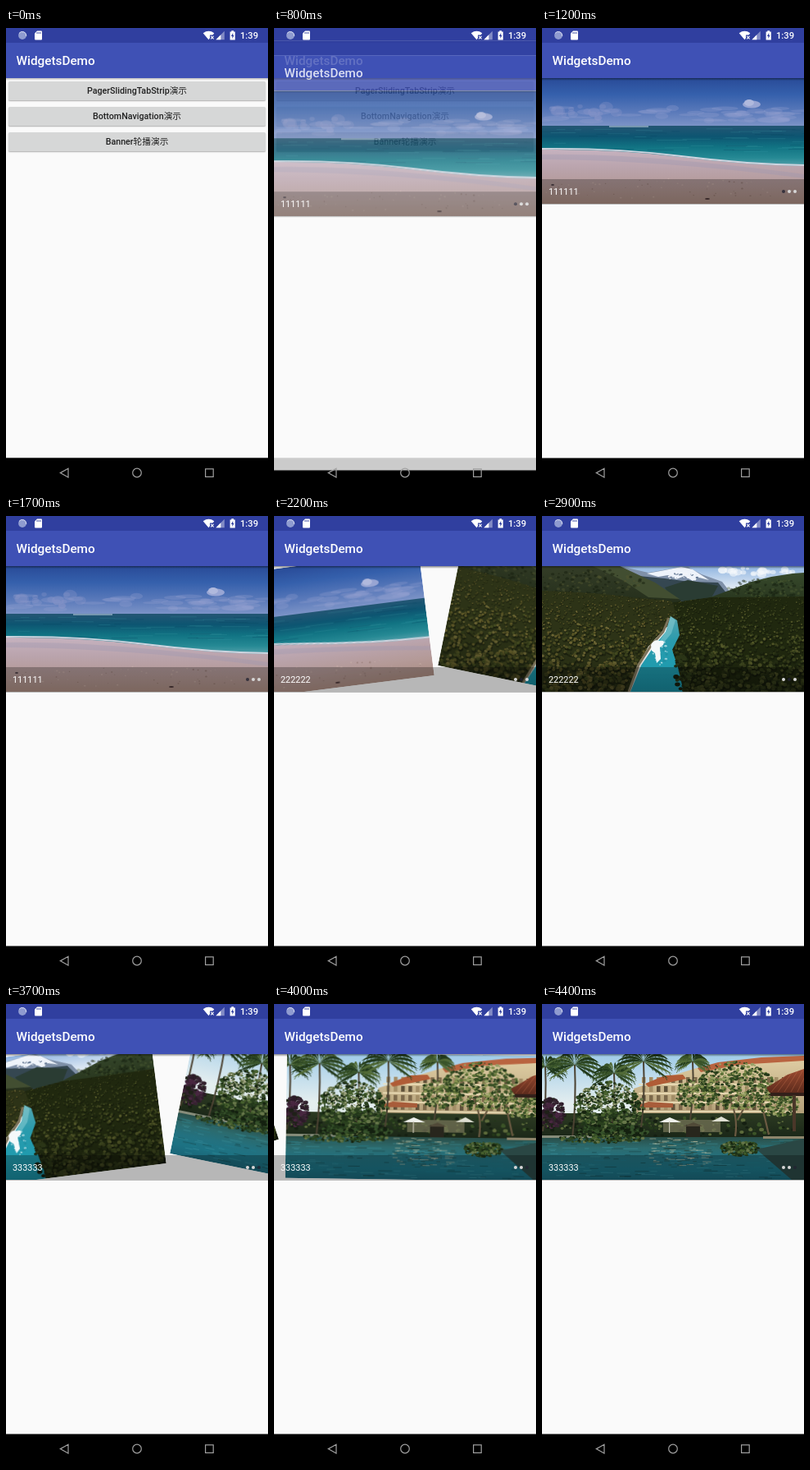
Animation, 320 px wide and 560 px high, one loop 8 s. Source, as an HTML page with a canvas:

```html
<!DOCTYPE html>
<html lang="zh">
<head>
<meta charset="utf-8">
<title>WidgetsDemo</title>
<style>
html, body { margin: 0; width: 100%; height: 100%; overflow: hidden; background: #000; }
#stage { position: relative; width: 320px; height: 560px; overflow: hidden; background: #000;
  font-family: Roboto, "Noto Sans CJK SC", "Noto Sans CJK", sans-serif; }
.screen { position: absolute; left: 0; top: 0; width: 320px; height: 523px; background: #fafafa;
  box-shadow: 0 1px rgba(250,250,250,.3); }
.status { height: 18px; background: #303f9f; }
.bar { position: relative; height: 43px; line-height: 44px; padding-left: 12.5px; background: #3f51b5;
  color: #fff; font-size: 15.3px; font-weight: 500; }
.bar::after { content: ""; position: absolute; left: 0; top: 43px; width: 100%; height: 3px; z-index: 2;
  background: linear-gradient(rgba(0,0,0,.25), transparent); }
.btn { position: absolute; left: 3px; width: 314px; height: 23px; line-height: 23px; border-radius: 1.5px;
  background: #d6d7d7; box-shadow: 0 1px 1.5px rgba(0,0,0,.3); color: #212121; text-align: center;
  font-size: 10.7px; font-weight: 500; overflow: hidden; }
#ripple { position: absolute; inset: 0; background: rgba(0,0,0,.12); }
#banner { position: absolute; left: 0; top: 61px; width: 320px; height: 153px; overflow: hidden;
  box-shadow: 0 1px rgba(0,0,0,.25); }
.page { position: absolute; left: 0; top: 0; transform-origin: 50% 100%; }
#strip { position: absolute; left: 0; bottom: 0; width: 320px; height: 30px; line-height: 31px;
  background: rgba(0,0,0,.27); color: #fff; font-size: 10.9px; }
#label { position: absolute; left: 8px; }
.dot { position: absolute; top: 13px; width: 4.4px; height: 4.4px; border-radius: 50%; }
#icons { position: absolute; left: 0; top: 0; }
</style>
</head>
<body>
<div id="stage">
  <div class="screen">
    <div class="status"></div>
    <div class="bar">WidgetsDemo</div>
    <div class="btn" style="top:65px">PagerSlidingTabStrip演示</div>
    <div class="btn" style="top:95.7px">BottomNavigation演示</div>
    <div class="btn" style="top:126.5px">Banner轮播演示<div id="ripple"></div></div>
  </div>
  <div class="screen" id="detail">
    <div class="status"></div>
    <div class="bar">WidgetsDemo</div>
    <div id="banner">
      <canvas class="page" width="320" height="153"></canvas>
      <canvas class="page" width="320" height="153"></canvas>
      <canvas class="page" width="320" height="153"></canvas>
      <div id="strip">
        <span id="label"></span>
        <i class="dot" style="left:292.8px"></i>
        <i class="dot" style="left:299.8px"></i>
        <i class="dot" style="left:306.8px"></i>
      </div>
    </div>
  </div>
  <svg id="icons" width="320" height="560" fill="#fff">
    <circle cx="20" cy="9" r="4.9" fill="#8f9bd0"/>
    <path d="M16 6.5A4.9 4.9 0 0 1 24.8 10" fill="none" stroke="#d5daf0"/>
    <path d="M38 3.5h5a1 1 0 0 1 1 1v9a1 1 0 0 1-1 1h-7a1 1 0 0 1-1-1v-7z"/>
    <path d="M38 5v2M40 5v2M42 5v2" stroke="#303f9f" stroke-width=".9"/>
    <path d="M240.7 6.2Q247.5 1.5 254.3 6.2L252.5 8.5H249V12.3L247.5 14.2z"/>
    <path d="M250.2 9.8l3.4 3.6M253.6 9.8l-3.4 3.6" stroke="#fff" stroke-width="1.1"/>
    <path d="M266.8 3.8v10.4h-10.4z" opacity=".4"/>
    <path d="M262.3 8.3v5.9h-5.9z"/>
    <path d="M275.3 3.2h2.8v1.2h1.7v10h-6.2v-10h1.7z"/>
    <path d="M277.2 6l-2.3 4h1.5v3l2.2-4.2h-1.4z" fill="#303f9f"/>
    <text x="286" y="13" font-size="11.2" font-weight="500">1:39</text>
    <g fill="none" stroke="#a0a0a0" stroke-width="1.2">
      <path d="M66.3 541.6L76 536.3V547z"/>
      <circle cx="160" cy="541.5" r="5.3"/>
      <rect x="243.6" y="536.8" width="9.6" height="9.6"/>
    </g>
  </svg>
</div>
<script>
const $ = s => document.querySelector(s), $$ = s => [...document.querySelectorAll(s)];
const pages = $$('.page'), dots = $$('.dot');
let c, seed = 7;
const rnd = () => (seed = seed * 16807 % 2147483647) / 2147483647;
const pick = list => list[Math.floor(rnd() * list.length)];

function grad(y0, y1, ...cols) {
  const g = c.createLinearGradient(0, y0, 0, y1);
  cols.forEach((col, i) => g.addColorStop(i / (cols.length - 1), col));
  return g;
}
function rect(x, y, w, h, fill) { c.fillStyle = fill; c.fillRect(x, y, w, h); }
function shape(d, fill) { c.fillStyle = fill; c.fill(new Path2D(d)); }
function line(d, col, w) { c.strokeStyle = col; c.lineWidth = w; c.stroke(new Path2D(d)); }
function oval(x, y, rx, ry, fill) {
  c.fillStyle = fill;
  c.beginPath();
  c.ellipse(x, y, rx, ry, 0, 0, 7);
  c.fill();
}
// Speckles spread over an ellipse
function leaves(n, x, y, rx, ry, size, cols) {
  for (let i = 0; i < n; i++) {
    const a = rnd() * 6.283, d = Math.sqrt(rnd()), r = size * (.5 + rnd());
    oval(x + Math.cos(a) * d * rx, y + Math.sin(a) * d * ry, r, r * .75, pick(cols));
  }
}
// Tree crowns inside an outline, larger towards the viewer
function forest(d, base, n, [x, y, w, h], cols) {
  c.save();
  c.clip(new Path2D(d));
  shape(d, base);
  for (let i = 0; i < n; i++) {
    const k = i / n, r = .7 + k * 2.2 * (.4 + rnd()), px = x + rnd() * w, py = y + k * h;
    oval(px + r * .3, py + r * .7, r * 1.2, r * 1.1, 'rgba(16,22,9,.45)');
    c.globalAlpha = .75;
    oval(px, py, r * .9, r * .8, pick(cols));
    c.globalAlpha = 1;
  }
  c.restore();
}
function palm(x, y, foot, size) {
  line(`M${x} ${y}Q${x + 2} ${(y + foot) / 2} ${x - 3} ${foot}`, '#4b4232', 2);
  for (let i = 0; i < 15; i++) {
    const a = -3.6 + i * .3, ex = x + Math.cos(a) * size, ey = y + Math.sin(a) * size * .55 + size * .25;
    const mx = (x + ex) / 2, my = y + Math.sin(a) * size * .6 - 2;
    const col = pick(['#223a1c', '#39542a', '#2c4522', '#526b38']);
    shape(`M${x} ${y}Q${mx} ${my - 3} ${ex} ${ey}Q${mx} ${my + 4} ${x} ${y}`, col);
    for (let k = .3; k < 1; k += .14) {
      const px = x + (ex - x) * k, py = y + (ey - y) * k + (my - (y + ey) / 2) * 2 * k * (1 - k);
      line(`M${px} ${py}l${Math.cos(a) * 3} 5`, col, .8);
    }
  }
}

function beach() {
  rect(0, 0, 320, 60, grad(0, 60, '#294b98', '#3560ac', '#5878b9', '#7f96c8'));
  for (let i = 0; i < 46; i++)
    oval(rnd() * 320, 36 + rnd() * 17, 6 + rnd() * 15, 1 + rnd() * 3, 'rgba(150,160,208,.28)');
  leaves(16, 55, 42, 55, 8, 6, ['rgba(142,152,203,.3)']);
  oval(256, 32, 11, 4.5, '#98a5d3');
  oval(253, 30, 6, 4, '#b0b9dd');
  rect(0, 58, 320, 60, grad(58, 110, '#245674', '#0d5571', '#117383', '#258994', '#63a7b1'));
  line('M82 59H130', '#c9d8ea', 1.2);
  for (let i = 0; i < 50; i++)
    rect(rnd() * 320, 61 + rnd() * 29, 8 + rnd() * 30, .8, pick(['rgba(8,68,95,.35)', 'rgba(70,165,170,.25)']));
  shape('M0 87Q90 86 170 96T320 107V153H0z', grad(87, 153, '#c5b2bf', '#baa4ad', '#b49a98', '#aa8c81'));
  line('M0 86Q90 85 170 95T320 106', '#cfd5e0', 1.8);
  shape('M0 93Q120 91 320 117V122Q150 100 0 99z', 'rgba(154,148,176,.35)');
  leaves(60, 160, 136, 160, 14, .9, ['rgba(110,80,70,.35)', 'rgba(215,190,180,.4)']);
  oval(13, 130, 2, .9, '#51434a');
  oval(202, 147, 3, 1, '#4a3538');
}

function valley() {
  rect(0, 0, 320, 60, grad(0, 26, '#8fb4e0', '#dfe9f4'));
  leaves(25, 265, 6, 50, 4, 4, ['rgba(245,248,252,.6)']);
  shape('M95 0L130 8L165 2L178 1L195 10L220 19L240 45H100z', '#7f90a8');
  shape('M128 9L150 5L170 1L184 4L204 17L192 14L184 18L174 12L164 16L154 11L142 13z', '#eef3fa');
  leaves(30, 172, 13, 22, 5, 1.2, ['#687c97', '#f2f5fa']);
  shape('M118 12L150 15L180 19L215 20L235 45H120z', '#354751');
  shape('M150 26L178 17L215 24L205 42H160z', '#2a3c33');
  shape('M0 0H80L112 12L142 27L170 42L150 66H0z', grad(0, 50, '#343d27', '#232d1a'));
  shape('M62 0H95L138 20L168 40L130 38L100 18z', '#424e31');
  shape('M320 8L306 9L280 13L256 19L230 29L200 40L190 65H320z', grad(8, 55, '#37492c', '#232f19'));
  leaves(130, 60, 20, 65, 16, 1.6, ['rgba(82,86,48,.45)', 'rgba(22,29,14,.5)']);
  leaves(130, 275, 27, 48, 12, 1.6, ['rgba(80,94,52,.4)', 'rgba(22,31,15,.5)']);
  const warm = ['#5c5829', '#71672f', '#494b20', '#353c1a', '#857a3f', '#4c5424'];
  const cool = ['#3a451d', '#4b5426', '#2b3516', '#60642f', '#232c13', '#434a20'];
  forest('M0 30Q70 32 110 38L158 42L170 62L150 76L130 98L116 122L106 153H0z', '#2d3317', 1300, [0, 28, 172, 126], warm);
  forest('M160 44L205 38L320 37V153H166L162 120L158 95L166 76z', '#20280f', 1300, [156, 35, 164, 119], cool);
  rect(0, 95, 320, 58, grad(95, 153, 'rgba(12,16,6,0)', 'rgba(12,16,6,.35)'));
  line('M155 63L148 80L133 97L118 120L106 153', '#7c735b', 3);
  shape('M157 61L151 80L137 97L121 121L108 153H173L166 123L159 102L168 84L165 66z', grad(60, 153, '#55a5b0', '#2a9bad', '#209bae', '#178598'));
  shape('M157 61L151 80L143 92L148 94L158 82L163 66z', 'rgba(165,222,225,.4)');
  leaves(45, 144, 105, 9, 16, 1.2, ['rgba(235,246,248,.6)', 'rgba(30,120,140,.35)']);
  shape('M133 96Q137 88 144 91Q151 90 148 96L144 99L145 113L140 118L138 106L134 103z', '#f4f9fa');
  leaves(60, 172, 128, 9, 25, 2.5, ['#1e2710', '#2b3517', '#161d0c']);
}

function resort() {
  rect(0, 0, 320, 100, grad(0, 60, '#9fcbe8', '#e4eeef'));
  shape('M112 42L150 29L195 15L275 5H320V94H112z', grad(10, 90, '#dccaa0', '#a8946e'));
  for (let y = 28; y < 80; y += 11) {
    rect(118, y + 8, 190, 1.6, '#eee0ba');
    for (let x = 122; x < 300; x += 9) rect(x, y, 4.5, 7, pick(['#7c694b', '#a38e67', '#5f5139']));
  }
  shape('M126 36L150 26L172 25L176 30L130 40z', '#b05c36');
  shape('M190 17L215 10L268 4L320 2V8L240 13L194 22z', '#b96440');
  shape('M112 64L130 58L160 60V65H112z', '#a85c3a');
  rect(0, 72, 320, 33, grad(72, 105, '#2c3a22', '#182416'));
  leaves(200, 160, 88, 165, 12, 2, ['#233719', '#3c5428', '#151f12', '#5d6b3b']);
  rect(148, 80, 70, 15, 'rgba(135,130,100,.6)');
  const lush = ['#1f331a', '#2f4921', '#47602e', '#16240f', '#67774a', '#2a401e'];
  palm(4, 15, 94, 28);
  palm(40, 13, 103, 36);
  palm(88, 23, 90, 28);
  palm(124, 9, 90, 37);
  palm(184, 9, 80, 22);
  leaves(170, 10, 72, 18, 18, 2.2, ['#2c1b28', '#482740', '#1f2118', '#352330']);
  leaves(620, 82, 65, 42, 31, 1.9, lush);
  leaves(190, 78, 52, 32, 16, .9, ['#b4b695', '#8c9a70', '#cfc8b4']);
  leaves(230, 85, 96, 44, 10, 2, ['#142010', '#22371a', '#35502a']);
  line('M236 100Q240 75 228 52M239 80L256 48M277 98L268 60L282 45', '#6b5a42', 2.2);
  const light = ['#3b5226', '#5b7137', '#83904e', '#25391a', '#98a168', '#334a22'];
  leaves(560, 237, 38, 46, 29, 1.7, light);
  leaves(210, 188, 48, 25, 18, 1.6, light);
  leaves(240, 288, 60, 27, 16, 1.6, light);
  shape('M274 41L300 25L320 18V48L278 47z', grad(18, 48, '#9c4b30', '#5a2a1c'));
  for (let i = 0; i < 6; i++) line(`M${280 + i * 8} ${46}L${298 + i * 7} ${25 - i * 2}`, 'rgba(210,120,85,.35)', 1);
  rect(279, 47, 41, 4, '#33201a');
  rect(306, 50, 4, 44, '#4a3729');
  shape('M143 83L156 77L170 83z', '#eef0eb');
  shape('M207 82L219 76L230 82z', '#dedfd2');
  rect(155, 82, 1.2, 14, '#c7c3b2');
  rect(176, 86, 17, 15, '#28261d');
  shape('M173 88L185 83L197 88z', '#514a38');
  rect(0, 101, 320, 52, grad(101, 153, '#294d47', '#2c6a6d', '#23717f', '#1d7283', '#1a6577'));
  rect(0, 99, 62, 3, '#868c7a');
  leaves(200, 72, 103, 52, 5, 1.6, lush);
  for (let i = 0; i < 190; i++)
    rect(rnd() * 310, 104 + rnd() * 47, 4 + rnd() * 14, .9, pick(['rgba(16,48,48,.45)', 'rgba(70,160,172,.4)', 'rgba(30,130,150,.35)']));
  for (let i = 0; i < 110; i++)
    rect(130 + rnd() * 74, 102 + rnd() * 34, 2 + rnd() * 9, 1, pick(['rgba(214,206,172,.5)', 'rgba(40,62,50,.5)']));
  leaves(230, 242, 115, 24, 9, 1.7, lush);
  shape('M262 116L320 103V153H305z', '#2a4744');
  rect(270, 100, 50, 3, '#8d856c');
}

[beach, valley, resort].forEach((draw, i) => { c = pages[i].getContext('2d'); draw(); });

const clamp = v => Math.min(1, Math.max(0, v));
const out = (k, power) => 1 - (1 - clamp(k)) ** power;
const slides = [2126, 3626], enter = 732;

function frame(now) {
  const t = Math.floor(now % 8000 / 100) * 100;

  const press = t < 100 ? 0 : .25 + .75 * out((t - 100) / 400, 2);
  $('#ripple').style.clipPath = `circle(${press * 160}px at 50% 50%)`;

  const detail = $('#detail').style;
  detail.opacity = out((t - enter) / 200, 4);
  detail.transform = `translateY(${44.8 * (1 - out((t - enter) / 350, 5))}px)`;

  const pos = slides.reduce((sum, s) => sum + out((t - s) / 800, 5), 0);
  const index = slides.filter(s => t > s).length;
  pages.forEach((el, i) => {
    const p = i - pos;
    el.style.visibility = Math.abs(p) < 1 ? 'visible' : 'hidden';
    el.style.transform = `translateX(${p * 320}px) rotate(${p * 18.75}deg)`;
  });
  $('#label').textContent = String(index + 1).repeat(6);
  dots.forEach((el, i) => el.style.background = i === index ? 'rgba(35,35,50,.8)' : '#d6d6d6');
  requestAnimationFrame(frame);
}
frame(performance.now());
</script>
</body>
</html>
```
